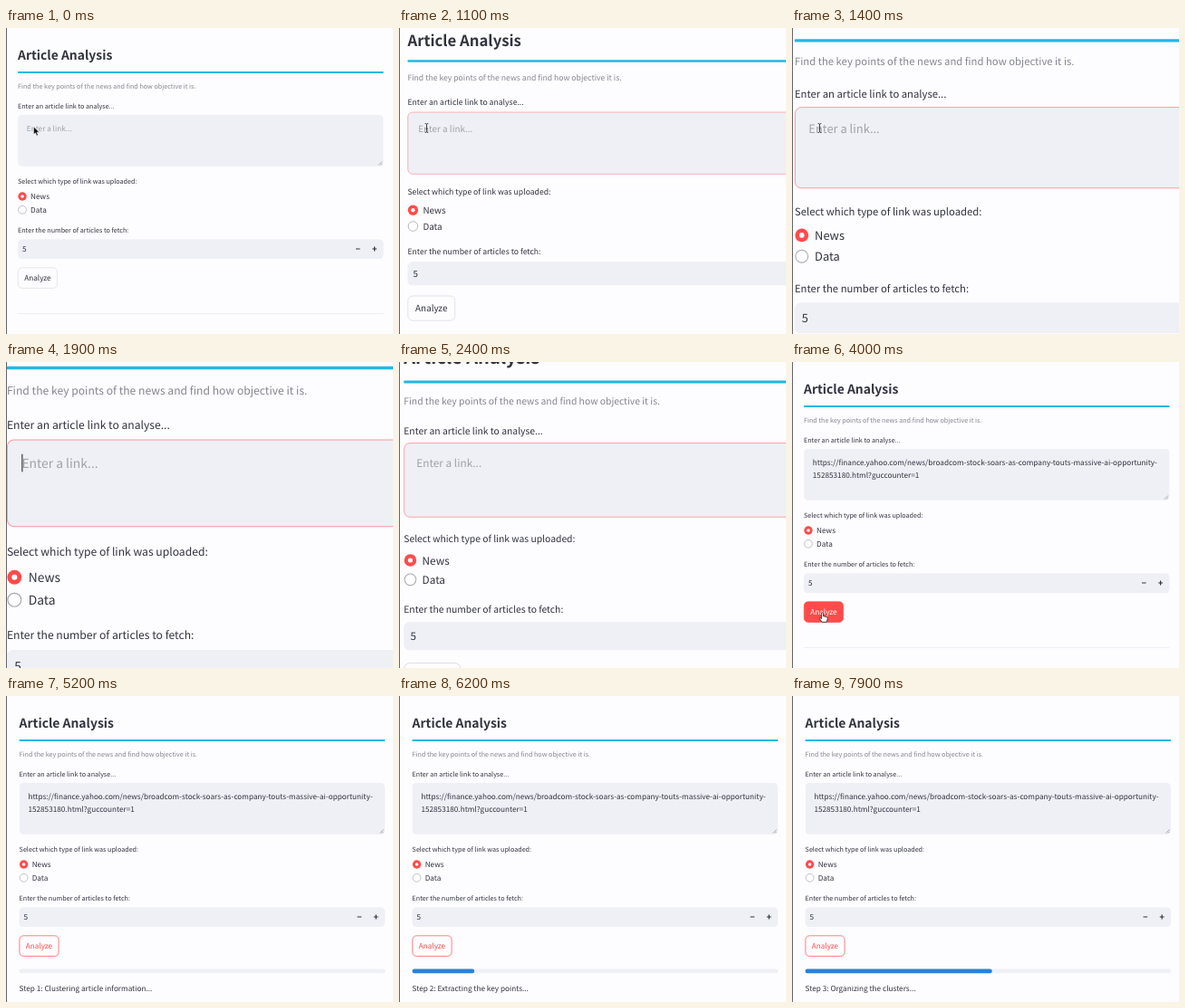
An HTML page for the animation above (8000 ms loop, 427 by 338 pixels).

```html
<!DOCTYPE html>
<html lang="en">
<head>
<meta charset="utf-8">
<title>Article Analysis</title>
<style>
  html, body { margin: 0; width: 100%; height: 100%; overflow: hidden; background: #fdfcfe; }
  svg { display: block; width: 427px; height: 338px; }
  text {
    font: 8.21px "Noto Sans CJK JP", "Noto Sans CJK SC", "Open Sans", sans-serif;
    fill: #31333f; text-rendering: geometricPrecision; white-space: pre;
  }
  .small { font-size: 7.2px; }
  .title { font-size: 13.9px; font-weight: 700; }
  .hint { font-size: 6.2px; }
  .grey { fill: #85868f; }
  .pale { fill: #a0a1aa; }
  .field { fill: #eef0f5; }
</style>
</head>
<body>
<svg viewBox="0 0 427 338">
  <g id="page">
    <text class="title" x="13" y="35">Article Analysis</text>
    <rect x="13" y="48" width="403.5" height="2" rx=".6" fill="#1fb9e4"/>
    <text class="small grey" x="13" y="66.5">Find the key points of the news and find how objective it is.</text>

    <text class="small" x="13" y="89.1">Enter an article link to analyse...</text>
    <rect class="field" id="area" x="13.3" y="96" width="403" height="56.8" rx="4.4" stroke="#ff4b4b" stroke-width=".6"/>
    <path d="M411 151.5l4-4M413.3 151.5l1.7-1.7" stroke="#777" stroke-width=".6"/>
    <text class="pale" id="placeholder" x="22.8" y="114.3">Enter a link...</text>
    <g id="link">
      <text x="22.8" y="114.3">https://finance.yahoo.com/news/broadcom-stock-soars-as-company-touts-massive-ai-opportunity-</text>
      <text x="22.8" y="127.6">152853180.html?guccounter=1</text>
    </g>
    <text class="hint grey" id="apply" x="414" y="150" text-anchor="end">Press ⌘+Enter to apply</text>
    <rect id="caret" width=".7" height="11.6" fill="#31333f"/>

    <text class="small" x="13" y="171.8">Select which type of link was uploaded:</text>
    <circle cx="18" cy="186" r="4.7" fill="#ff4b4b"/>
    <circle cx="18" cy="186" r="1.8" fill="#fff"/>
    <text x="27.1" y="189.2">News</text>
    <circle cx="18" cy="200.8" r="4.4" fill="#fff" stroke="#a9aab2" stroke-width=".7"/>
    <text x="27.1" y="204">Data</text>

    <text class="small" x="13" y="226.4">Enter the number of articles to fetch:</text>
    <rect class="field" x="13" y="233.5" width="403.5" height="21.5" rx="4.4"/>
    <text x="18" y="247.3">5</text>
    <path d="M386 244h4.6M404.2 244h4.8M406.6 241.6v4.8" stroke="#31333f" stroke-width="1.2"/>

    <rect id="button" x="13.3" y="264.8" width="43.2" height="22.6" rx="4.4" stroke-width=".7"/>
    <text id="buttonText" x="34.9" y="279.2" text-anchor="middle">Analyze</text>

    <path id="rule" d="M13 315.5h403.5" stroke="#e9e9ee" stroke-width=".7"/>
    <g id="progress">
      <rect class="field" x="13" y="301.6" width="403.5" height="4.6" rx="2.3"/>
      <rect id="bar" x="13" y="301.6" height="4.6" rx="2.3" fill="#2683dd"/>
      <text id="step" x="13" y="325.7"></text>
    </g>
  </g>
  <rect width="1" height="338" fill="#66666a"/>
  <path id="arrow" d="M0 0v8.6l2-1.8 1.4 3.1 1.5-.7-1.4-3h2.7z" fill="#111" stroke="#fff" stroke-width=".5"/>
  <path id="beam" d="M-1.8-5q1.8 0 1.8 1.2v7.6q0 1.2-1.8 1.2M1.8-5Q0-5 0-3.8M0 3.8Q0 5 1.8 5M-.9 .9h1.8" fill="none" stroke="#333" stroke-width=".9"/>
  <path id="hand" d="M-.9 .8Q0-.4 .9 .8V4.2l4 .9q1 .4.8 1.5L5 10.8H-.2L-3 7.2q-.3-1.3 1-.9L-.9 7.2z" fill="#fff" stroke="#222" stroke-width=".8"/>
</svg>
<script>
const LOOP = 8000, FOCUS = 500, PASTE = 2700, CLICK = 4000, RUN = 4400, DONE = 7900;
const RED = '#ff4b4b', INK = '#31333f', BACK = '#fdfcfe';
const steps = [
  [RUN, 0, 'Step 1: Clustering article information...'],
  [6000, .17, 'Step 2: Extracting the key points...'],
  [7000, .34, 'Step 2: Extracting the key points...'],
  [DONE, .511, 'Step 3: Organizing the clusters...']
];

const el = id => document.getElementById(id);
const set = (id, attrs) => {
  for (const key in attrs) el(id).setAttribute(key, attrs[key]);
};
const show = (id, on) => set(id, { visibility: on ? 'visible' : 'hidden' });
const ramp = (t, from, to) => Math.max(0, Math.min(1, (t - from) / (to - from)));
const ease = (t, from, to) => (1 - Math.cos(Math.PI * ramp(t, from, to))) / 2;

function drawPage(t) {
  const zoom = 1 + .688 * (ease(t, 800, 1625) - ease(t, 2220, 2660));
  const shift = t >= RUN ? 1.6 : 0;
  set('page', { transform: `translate(${30.6 + shift} 110.7) scale(${zoom}) translate(-30.6 -110.7)` });

  const pasted = t >= PASTE, focused = t >= FOCUS && t < CLICK;
  set('area', { 'stroke-opacity': focused ? .55 * ramp(t, FOCUS - 50, FOCUS + 150) : 0 });
  show('placeholder', !pasted);
  show('link', pasted);
  show('apply', pasted && focused);
  const blink = Math.floor((t - (pasted ? PASTE : FOCUS)) / 500) % 2 === 0;
  set('caret', pasted ? { x: 140, y: 118.6 } : { x: 22.7, y: 105.4 });
  show('caret', focused && blink);
}

function drawButton(t, hover) {
  const pressed = t >= CLICK && t < CLICK + 250;
  const active = hover || t >= CLICK;
  set('button', { fill: pressed ? RED : BACK, stroke: active ? RED : '#dedee4' });
  set('buttonText', { style: `fill:${pressed ? '#fff' : active ? RED : INK}` });
}

function drawProgress(t) {
  const running = t >= RUN;
  show('rule', !running);
  show('progress', running);
  // The last jump is immediate; earlier ones glide.
  let value = 0, label = '';
  for (const [start, target, text] of steps) {
    if (t < start) break;
    value += (target - value) * (start === DONE ? 1 : ease(t, start - 80, start + 200));
    label = text;
  }
  set('bar', { width: 403.5 * value });
  el('step').textContent = label;
}

function drawPointer(t) {
  const move = ease(t, 2800, 3560);
  const x = 30.5 + 3 * move, y = 110.5 + 166 * move;
  const visible = t < 1750 || (t >= 2800 && t < RUN);
  const hover = y > 264;
  const kind = t < 100 ? 'arrow' : y < 153 ? 'beam' : hover ? 'hand' : 'arrow';
  for (const id of ['arrow', 'beam', 'hand']) {
    set(id, { transform: `translate(${x} ${y - (t < 100 ? 1.5 : 0)})` });
    show(id, visible && id === kind);
  }
  return hover;
}

function frame() {
  const t = performance.now() % LOOP;
  drawPage(t);
  drawButton(t, drawPointer(t));
  drawProgress(t);
  requestAnimationFrame(frame);
}
frame();
</script>
</body>
</html>
```
